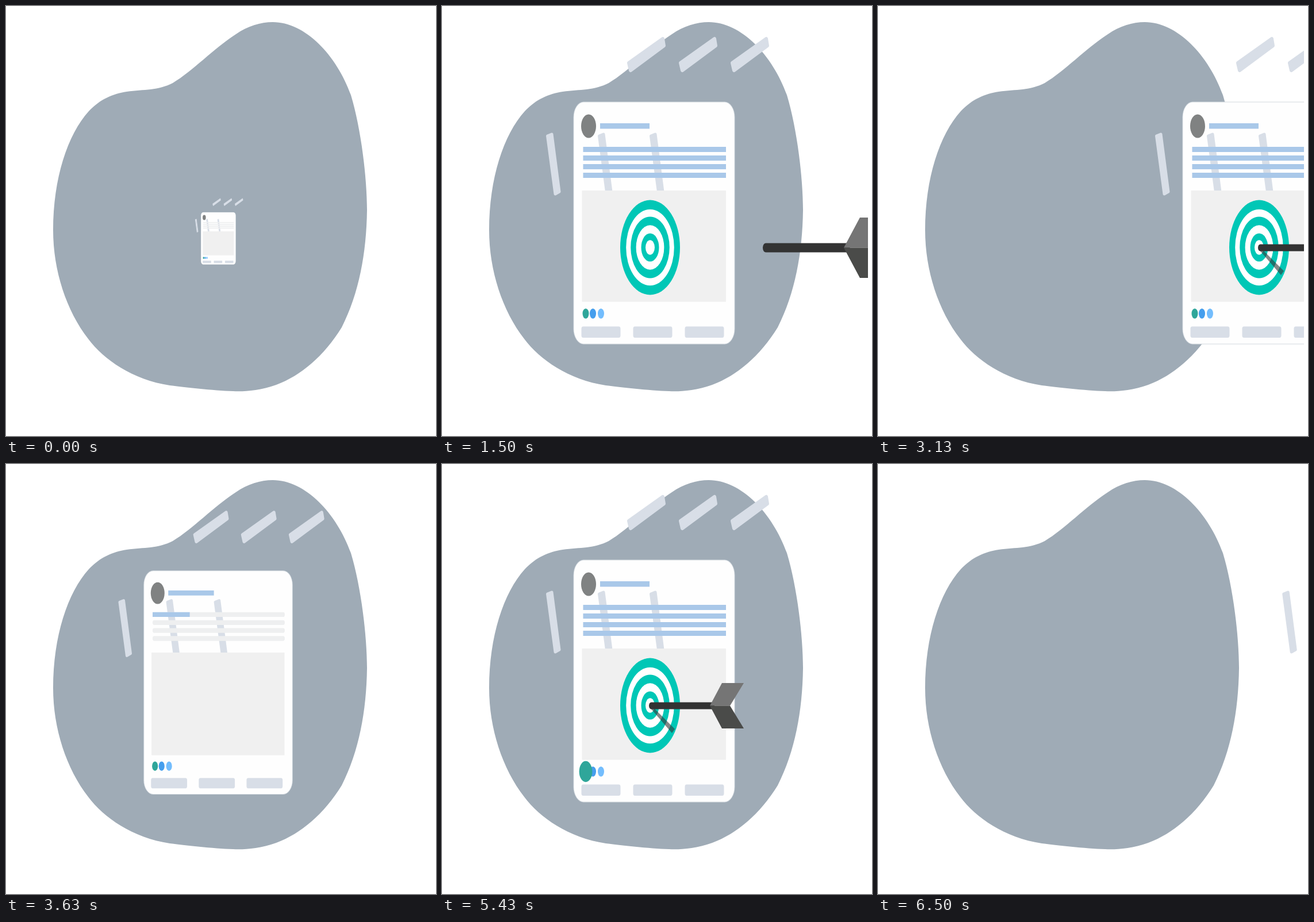
Animation, 748 px wide and 748 px high, one loop 6.53 s. Source, as an HTML page with a canvas:

```html
<!DOCTYPE html>
<html lang="en">
<head>
<meta charset="utf-8">
<style>
  html, body { margin: 0; width: 100%; height: 100%; overflow: hidden; background: #fff; }
  canvas { display: block; width: 748px; height: 748px; }
</style>
</head>
<body>
<canvas id="stage" width="748" height="748"></canvas>
<script>
const ctx = document.getElementById('stage').getContext('2d');
const PERIOD = 6530 / 2;
const COLORS = {
  blob: '#9fabb6', bar: '#d8dee7', card: '#fefefe', panel: '#f0f0f0',
  line: '#a9c8e9', avatar: '#808282', teal: '#00c7b6'
};
const blob = new Path2D(`M464 28C520 28 575 85 600 155C618 215 628 300 628 355
  C627 430 614 500 584 559C553 609 513 643 470 659C440 670 410 671 395 670
  C360 669 310 663 285 660C220 650 170 615 143 579C105 530 82 460 82 390
  C82 300 107 224 144 183C164 162 185 153 210 149C240 145 265 147 290 134
  C325 113 360 75 400 49C420 35 443 28 464 28Z`);

const clamp = v => Math.max(0, Math.min(1, v));
const progress = (t, start, end) => clamp((t - start) / (end - start));
const smooth = u => u * u * (3 - 2 * u);
const mix = (a, b, u) => a + (b - a) * u;

function rect(color, x, y, w, h, rx = 0, ry = rx) {
  ctx.fillStyle = color;
  ctx.beginPath();
  ctx.roundRect(x, y, w, h, { x: rx, y: ry });
  ctx.fill();
}

function ellipse(color, x, y, rx, ry) {
  ctx.fillStyle = color;
  ctx.beginPath();
  ctx.ellipse(x, y, rx, ry, 0, 0, 2 * Math.PI);
  ctx.fill();
}

function polygon(color, points, rounding = 0) {
  ctx.beginPath();
  points.forEach(([x, y]) => ctx.lineTo(x, y));
  ctx.closePath();
  ctx.fillStyle = ctx.strokeStyle = color;
  ctx.fill();
  if (rounding) {
    ctx.lineWidth = rounding;
    ctx.lineJoin = 'round';
    ctx.stroke();
  }
}

function drawCard(t) {
  rect('#d3dae0', 228.5, 166.5, 281, 422, 18, 27);
  rect(COLORS.card, 229.5, 167.5, 279, 420, 17, 26);

  for (let i = 0; i < 3; i++) {
    const dx = 90 * i;
    polygon(COLORS.bar, [[325, 99], [384, 57], [386, 69], [328, 112]].map(([x, y]) => [x + dx, y]), 6);
    polygon(COLORS.bar, [[183.5, 226], [191, 223], [204, 323], [197, 327]].map(([x, y]) => [x + dx, y]), 5);
    rect(COLORS.bar, 242.5 + dx, 557.5, 68, 19.5, 3, 4);
  }

  ellipse(COLORS.avatar, 255, 209, 13, 20.5);
  rect(COLORS.line, 275, 204, 86 * progress(t, 225, 335), 9.5);
  for (let i = 0; i < 4; i++) {
    const y = 245 + 15 * i, start = 335 + 110 * i;
    const drawn = progress(t, start, start + 110);
    if (drawn < 1) rect('#eeeff0', 245.5, y, 249, 9, 3, 4);
    rect(COLORS.line, 245.5, y, 248.5 * drawn, 9);
  }
  rect(COLORS.panel, 243.5, 321, 250.5, 193.5);
}

function drawDots(t) {
  const dots = [[250, '#2fa69a'], [262.5, '#459eed'], [276.5, '#73bdfd']];
  for (let i = 2; i >= 0; i--) {
    const u = progress(t, 2000 + 185 * i, 2420 + 185 * i);
    const scale = 1 + 1.35 * (1 - Math.abs(2 * u - 1));
    const [x, color] = dots[i];
    ellipse(color, x, 535, 5.5 * scale, 8.8 * scale);
  }
}

function drawTarget(t) {
  if (t < 1050) return;
  const x = mix(-177, 362, smooth(progress(t, 1050, 1440)));
  const scale = 1 + (362 - x) / 280;
  [52, 41.8, 33.8, 24.4, 15.5, 8].forEach((r, i) =>
    ellipse(i % 2 ? '#fff' : COLORS.teal, x, 420, r * scale, r * 1.585 * scale));
}

function drawArrow(t) {
  if (t < 1400) return;
  const tip = mix(762, 360, smooth(progress(t, 1400, 1600)));
  const scale = 1 + (tip - 360) / 600;
  const shadow = progress(t, 1600, 1690);
  if (shadow) {
    const d = 37 * shadow;
    polygon('rgba(50,55,55,.6)', [[362, 424], [368, 424], [368 + d, 424 + d], [363 + d, 431 + d]]);
  }
  ctx.save();
  ctx.translate(tip, 420.5);
  ctx.scale(scale, scale);
  rect('#333', 0, -6, 114, 12, 4, 6);
  for (const [side, color] of [[-1, '#757575'], [1, '#4a4b49']])
    polygon(color, [[106, 0], [127, 39.5 * side], [165, 39.5 * side], [141, 0]]);
  ctx.restore();
}

function draw(t) {
  ctx.fillStyle = '#fff';
  ctx.fillRect(0, 0, 748, 748);
  ctx.fillStyle = COLORS.blob;
  ctx.fill(blob);

  ctx.save();
  ctx.beginPath();
  ctx.rect(0, 0, 741, 748);
  ctx.clip();

  // Pop in around a fixed point, then leave to the right.
  const pop = 1 - (1 - progress(t, -56, 678)) ** 3;
  const exit = 594 * progress(t, 2800, PERIOD) ** 2;
  ctx.translate(369.5 + exit, 411.5);
  ctx.scale(pop, pop);
  ctx.translate(-369.5, -411.5);
  drawCard(t);
  drawDots(t);
  drawTarget(t);
  drawArrow(t);
  ctx.restore();
}

const begin = performance.now();
function tick() {
  draw((performance.now() - begin) % PERIOD);
  requestAnimationFrame(tick);
}
tick();
</script>
</body>
</html>
```
